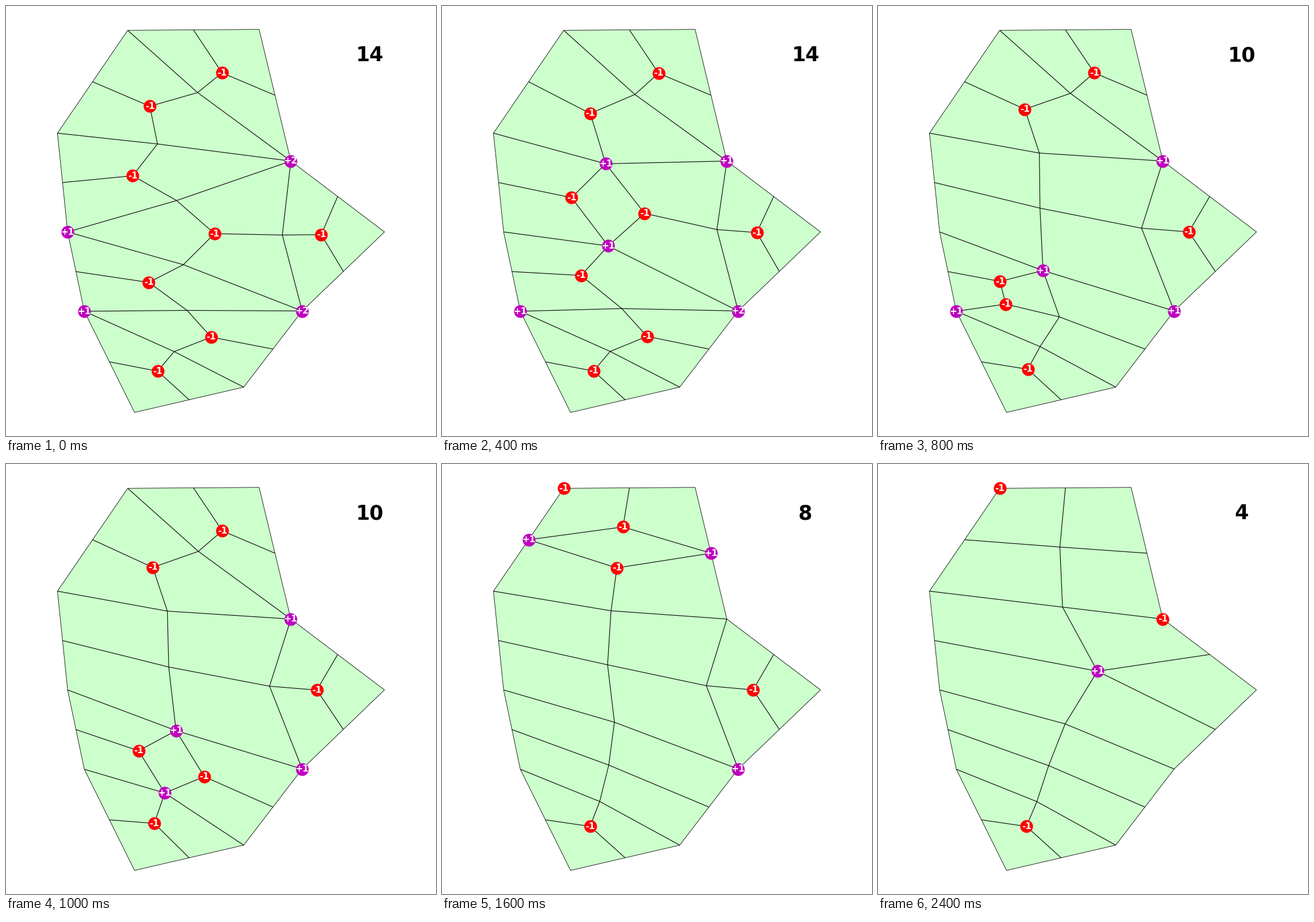
Recreate the animation shown at these times as a matplotlib script. Size 748 by 748 pixels, loop 3400 ms.

```python
import numpy as np
import matplotlib.pyplot as plt
from matplotlib.animation import FuncAnimation
from matplotlib.collections import LineCollection

SIZE = 748
FRAMES = 17
SWEEPS = 5  # smoothing passes after each edit

# Boundary: corners at A, C, E, ... with edge midpoints between them
RING = "ABCDEFGHIJKLMNOPQRST"
CORNERS = np.array([
    (211.7, 42.3), (440.3, 40.7), (495.5, 269.7), (658.4, 393), (515.2, 530.5),
    (413.5, 663), (223.6, 707), (136.2, 531), (107.2, 393), (89.5, 221.2)])
IDEAL = {**dict.fromkeys(RING, 3), "C": 2, "G": 2, "M": 2, "E": 4}

INNER = {
    "a": (375.8, 116.3), "b": (333.3, 150.6), "c": (250.2, 174.4),
    "d": (263.5, 240), "e": (220.4, 295.3), "f": (296.8, 338.4),
    "g": (362.8, 396), "h": (480.7, 398.4), "i": (308.5, 450),
    "j": (548.4, 397.7), "k": (248.4, 480.8), "l": (315, 529.5),
    "m": (357, 576), "n": (292.5, 601.2), "o": (263.8, 635.2)}
LINKS = ("aB aD ab bA bE bc cT cd dS dE de eR ef fQ fE fg gh gi "
         "hE hI hj iQ iI ik jF jH kP kl lO lI lm mJ mn nO nK no oN oL")

# ("turn", old edge, new edge) or ("merge", kept vertex, dropped vertex)
EDITS = [
    ("turn", "fQ", "ei"), ("merge", "d", "f"), ("merge", "g", "e"),
    ("turn", "lI", "im"), ("merge", "n", "l"), ("merge", "m", "k"),
    ("turn", "Ab", "Ta"), ("merge", "D", "b"), ("merge", "a", "c"),
    ("turn", "Eh", "dj"), ("merge", "H", "h"), ("merge", "g", "j")]


def link(adj, u, v):
    adj.setdefault(u, set()).add(v)
    adj.setdefault(v, set()).add(u)


def unlink(adj, u, v):
    adj[u].discard(v)
    adj[v].discard(u)


def turn(pos, adj, old, new):
    unlink(adj, *old)
    link(adj, *new)


def merge(pos, adj, keep, drop):
    if keep.islower():  # boundary vertices stay put
        pos[keep] = (pos[keep] + pos[drop]) / 2
    for v in list(adj[drop]):
        unlink(adj, drop, v)
        link(adj, keep, v)
    del adj[drop], pos[drop]


def smooth(pos, adj):
    """Move every inner vertex to the mean of its neighbours."""
    for _ in range(SWEEPS):
        pos.update({v: np.mean([pos[n] for n in sorted(adj[v])], axis=0)
                    for v in sorted(adj) if v.islower()})


def snapshot(pos, adj):
    lines = [(pos[u], pos[v]) for u in sorted(adj) for v in sorted(adj[u])
             if u < v and not (u.isupper() and v.isupper())]
    nodes = [(pos[v], len(adj[v]) - IDEAL.get(v, 4)) for v in sorted(adj)]
    return lines, [(p, s) for p, s in nodes if s]


def build():
    pos = {v: np.array(p) for v, p in INNER.items()}
    mids = (CORNERS + np.roll(CORNERS, -1, axis=0)) / 2
    pos.update(zip(RING[::2], CORNERS))
    pos.update(zip(RING[1::2], mids))
    adj = {}
    for u, v in zip(RING, RING[1:] + RING[0]):
        link(adj, u, v)
    for u, v in LINKS.split():
        link(adj, u, v)
    states = [snapshot(pos, adj)]
    for kind, first, second in EDITS:
        edit = turn if kind == "turn" else merge
        edit(pos, adj, first, second)
        smooth(pos, adj)
        states.append(snapshot(pos, adj))
    return states


STATES = build()

fig = plt.figure(figsize=(SIZE / 100, SIZE / 100), dpi=100, facecolor="white")
ax = fig.add_axes([0, 0, 1, 1])


def label(x, y, text, **style):
    ax.text(x, y, text, weight="bold", family="DejaVu Sans",
            ha="center", va="center", zorder=4, **style)


def draw(frame):
    lines, nodes = STATES[min(frame, len(STATES) - 1)]
    ax.clear()
    ax.set(xlim=(0, SIZE), ylim=(SIZE, 0))
    ax.axis("off")
    ax.fill(*CORNERS.T, fc=(0.8, 1, 0.8), ec="black", lw=0.6, zorder=1)
    ax.add_collection(LineCollection(lines, colors="black", linewidths=0.8,
                                     zorder=2))
    for (x, y), score in nodes:
        ax.plot(x, y, "o", color="m" if score > 0 else "r", ms=15, zorder=3)
        label(x, y, f"{score:+d}", color="white", size=11)
    total = sum(abs(score) for _, score in nodes)
    label(632.3, 86, str(total), color="black", size=25)
    return ax.get_children()


anim = FuncAnimation(fig, draw, frames=FRAMES, interval=200, repeat=True,
                     repeat_delay=0, blit=False)
plt.show()
```
